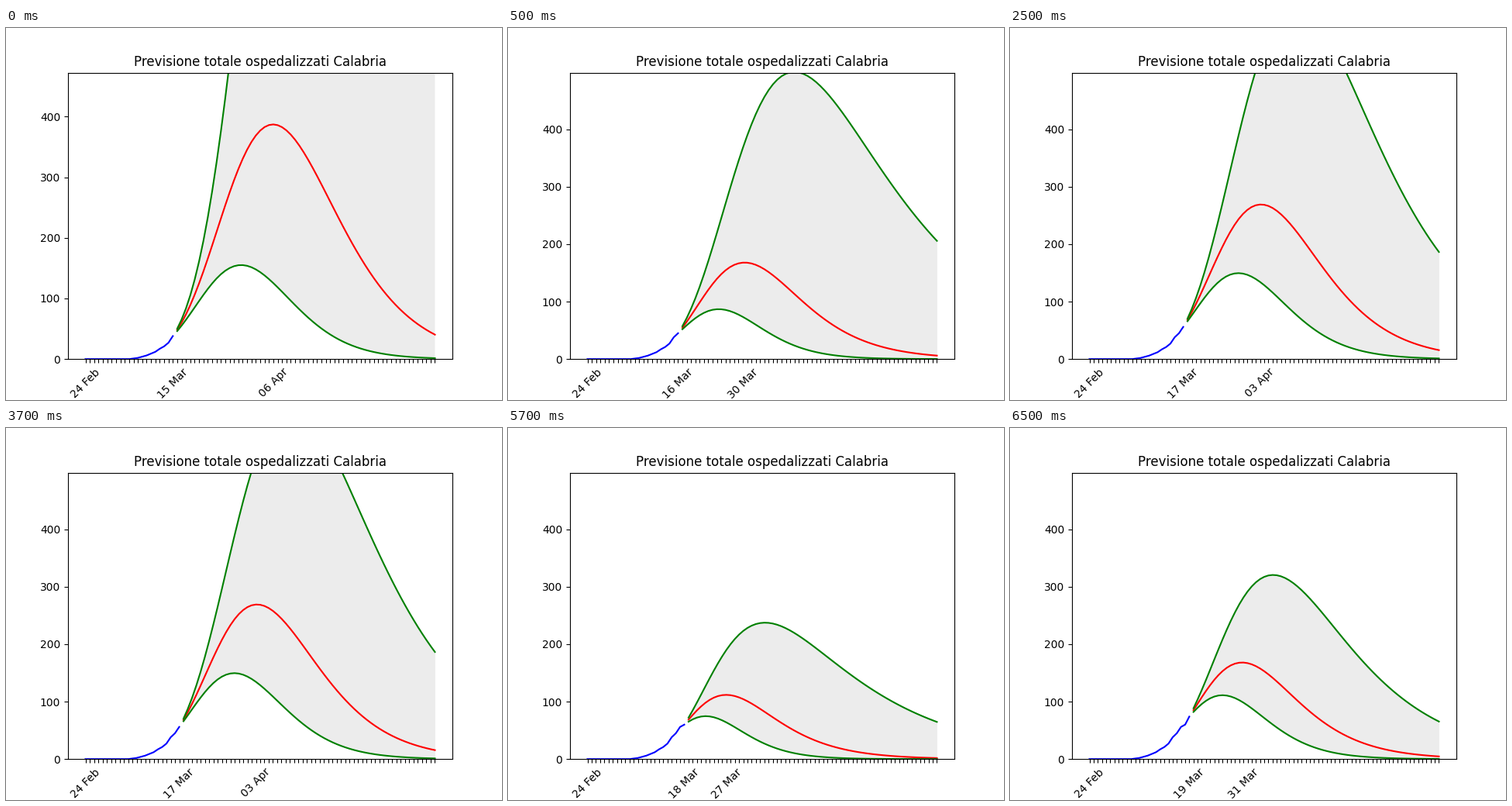
A matplotlib script for the animation above (8 s loop, 640x480 px).

```python
import numpy as np
import matplotlib.pyplot as plt
from matplotlib.animation import FuncAnimation

START = np.datetime64("2020-02-24")
FIRST_FORECAST_DAY = 20
FORECAST_DAYS = 60
DECLINE = 0.1  # daily loss that growth settles to

# Latest observed value, peak day, decay of the growth rate, spread of the rate
FORECASTS = [
    (38, 42.95, 0.0580, 0.0528),
    (45, 36.45, 0.0763, 0.0584),
    (56, 40.25, 0.0650, 0.0412),
    (60, 32.95, 0.0940, 0.0580),
    (74, 36.70, 0.0755, 0.0430),
]
STEP_MS = 500
SCHEDULE = np.repeat(range(5), [1, 4, 4, 4, 3])


def date_label(day):
    return (START + int(day)).item().strftime("%d %b")


def observed_until(index):
    """Power-law outbreak followed by the values known at each forecast."""
    days = np.arange(FIRST_FORECAST_DAY)
    early = np.round(27 * (np.clip(days - 9, 0, None) / 10) ** 2.2)
    return np.append(early, [row[0] for row in FORECASTS[:index + 1]])


def forecast(last, observed, peak_day, decay, shift):
    """Compound a daily growth rate that decays exponentially."""
    midday = last + 0.5 + np.arange(FORECAST_DAYS)
    growth = DECLINE * (np.exp(-decay * (midday - peak_day)) - 1) + shift
    return observed * np.cumprod(1 + growth)


fig, ax = plt.subplots(figsize=(6.4, 4.8), dpi=100)


def draw(step):
    index = SCHEDULE[step]
    observed, peak_day, decay, spread = FORECASTS[index]
    last = FIRST_FORECAST_DAY + index
    end = last + FORECAST_DAYS
    days = np.arange(last + 1, end + 1)
    lower, middle, upper = (forecast(last, observed, peak_day, decay, shift)
                            for shift in (-spread, 0, spread))

    ax.clear()
    ax.set_title("Previsione totale ospedalizzati Calabria")
    ax.fill_between(days, lower, upper, color="gray", alpha=0.15, linewidth=0)
    ax.plot(observed_until(index), color="blue")
    ax.plot(days, middle, color="red")
    ax.plot(days, upper, color="green")
    ax.plot(days, lower, color="green")

    top_day = days[np.argmax(middle)]
    labels = {0: date_label(0), last: date_label(last),
              top_day: date_label(top_day - 1)}
    ticks = range(end + 1)
    ax.set_xticks(ticks, [labels.get(day, "") for day in ticks], rotation=45)
    ax.set_yticks(range(0, 500, 100))
    ax.set_xlim(-0.05 * end, 1.05 * end)
    ax.set_ylim(0, 472.6 if index == 0 else 498.7)
    return []


anim = FuncAnimation(fig, draw, frames=len(SCHEDULE), init_func=lambda: draw(0),
                     interval=STEP_MS, repeat=True, repeat_delay=0)
plt.show()
```
